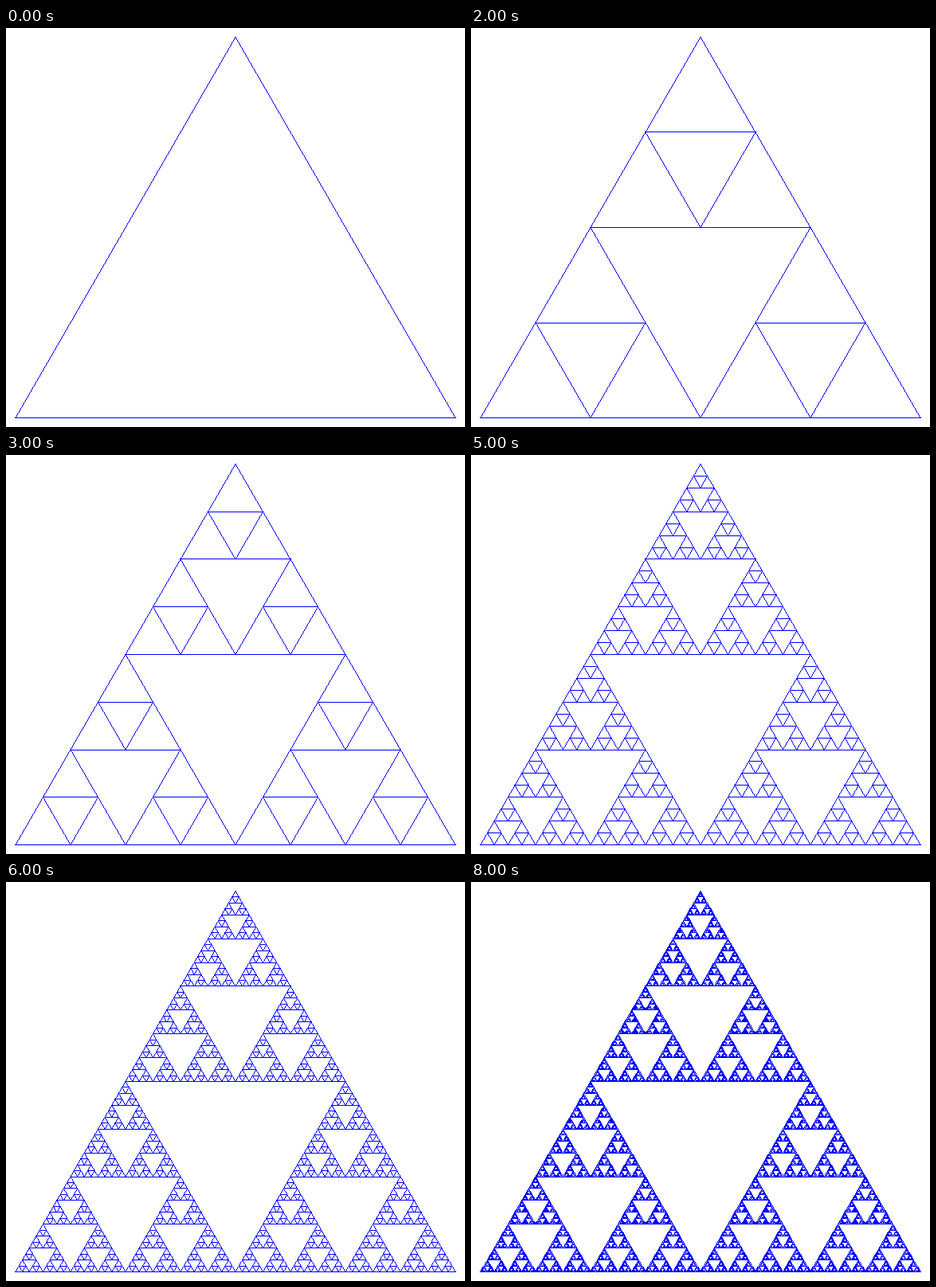
Recreate the animation shown at these times as an HTML page with a canvas. Size 576x501 px, loop 9 s.

```html
<!DOCTYPE html>
<html lang="en">
<head>
<meta charset="utf-8">
<title>Sierpinski triangle</title>
<style>
  html, body { margin: 0; width: 100%; height: 100%; overflow: hidden; background: #fff; }
  canvas { display: block; }
</style>
</head>
<body>
<canvas id="stage" width="576" height="501"></canvas>
<script>
const ctx = document.getElementById('stage').getContext('2d');
const W = 576, H = 501, SIDE = 552;
const RATIO = Math.sqrt(3) / 2;
const STEP = 1000, LEVELS = 9;
const TOP = (H - SIDE * RATIO) / 2;

// One-pixel lines without antialiasing
function level(x1, x2, y) {
  const left = Math.floor(x1 - 0.05);
  ctx.fillRect(left, Math.floor(y), Math.floor(x2 + 0.05) - left + 1, 1);
}

function sides(x, y, height) {
  const last = Math.floor(y + height);
  for (let row = Math.floor(y); row <= last; row++) {
    const dx = (row + 0.5 - y) / (2 * RATIO);
    ctx.fillRect(Math.floor(x - dx), row, 1, 1);
    ctx.fillRect(Math.floor(x + dx), row, 1, 1);
  }
}

// (x, y) is the apex
function triangle(x, y, side, depth) {
  const height = side * RATIO;
  if (depth === 0) {
    sides(x, y, height);
    level(x - side / 2, x + side / 2, y + height);
    return;
  }
  const half = side / 2;
  triangle(x, y, half, depth - 1);
  triangle(x - half / 2, y + height / 2, half, depth - 1);
  triangle(x + half / 2, y + height / 2, half, depth - 1);
}

let shown = -1;
function draw(depth) {
  if (depth === shown) return;
  shown = depth;
  ctx.fillStyle = '#fff';
  ctx.fillRect(0, 0, W, H);
  ctx.fillStyle = '#00f';
  triangle(W / 2, TOP, SIDE, depth);
}

const start = performance.now();
function tick() {
  draw(Math.floor((performance.now() - start) / STEP) % LEVELS);
  requestAnimationFrame(tick);
}
tick();
</script>
</body>
</html>
```
